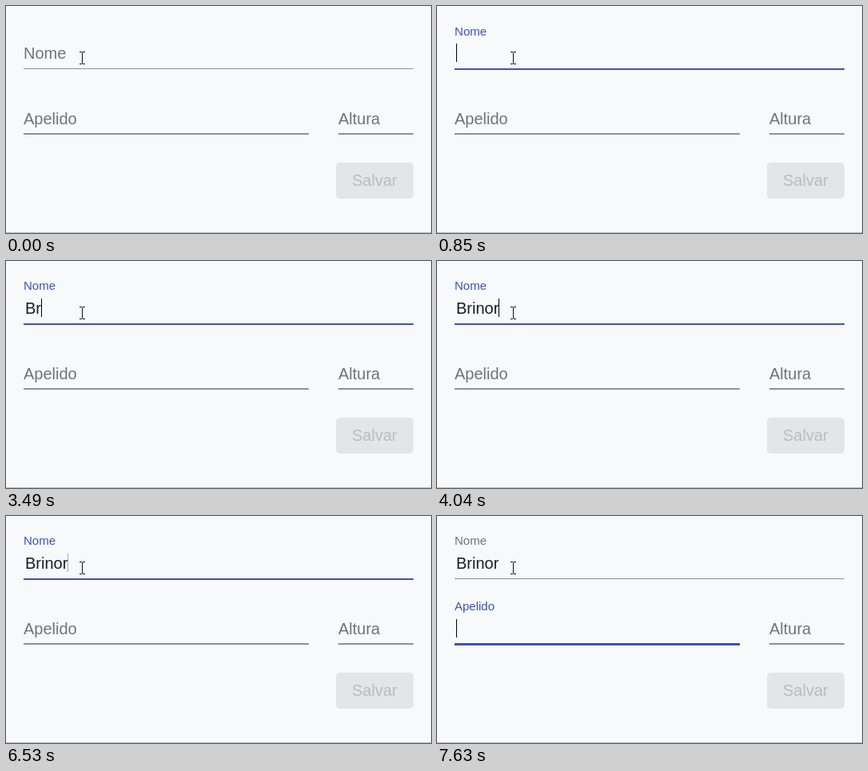
Recreate the animation shown at these times as an HTML page. Size 532 by 284 pixels, loop 8000 ms.

```html
<!DOCTYPE html>
<html lang="pt">
<head>
<meta charset="utf-8">
<title>Formulário</title>
<style>
  html, body { margin: 0; width: 100%; height: 100%; overflow: hidden; background: #f7f9fb; }
  svg { display: block; width: 532px; height: 284px; }
  text { font: 20px "Liberation Sans", Arial, sans-serif; white-space: pre; }
  rect, .pointer { shape-rendering: crispEdges; }
  .label { fill: rgb(114, 115, 117); }
  .line { fill: #909194; }
  .ripple { fill: #3f51b5; }
</style>
</head>
<body>
<svg viewBox="0 0 532 284">
  <rect width="532" height="284" fill="#f7f9fb"/>
  <rect y="283" width="532" height="1" fill="#bfc0c3"/>

  <rect class="line" x="22" y="78" width="488" height="1"/>
  <rect class="ripple" id="nameRipple" y="78" height="2"/>
  <text class="label" id="nameLabel">Nome</text>
  <text id="value" x="24" y="66" fill="#1c1c1d"></text>

  <rect class="line" x="22" y="159" width="357" height="2"/>
  <rect class="ripple" id="nickRipple" y="159" height="3"/>
  <text class="label" id="nickLabel">Apelido</text>

  <rect class="line" x="416" y="159" width="94" height="2"/>
  <text class="label" x="416" y="148">Altura</text>

  <rect x="413" y="196" width="97" height="45" rx="5" fill="#e4e5e6" style="shape-rendering:auto"/>
  <text x="433" y="225" fill="#bbbcbd">Salvar</text>

  <rect id="caret" width="1" height="23"/>
  <path class="pointer" fill="none" stroke="#111"
        d="M92 57.5h3m1 0h3M95.5 58v14M92 72.5h3m1 0h3"/>
</svg>
<script>
const LOOP = 8000;
const NAME = "Brinor";
const NAME_FOCUS = 580, NICK_FOCUS = 6580;
const KEY_TIMES = [2880, 3490, 3660, 3810, 3960, 4040];

// The screen refreshes in bursts: [first, last, steps].
const BURSTS = [
  [0, 0, 1], [610, 1160, 8], [1540, 1630, 2], [2010, 2170, 3], [2560, 2650, 2],
  [2880, 2880, 1], [3260, 3490, 4], [3660, 3660, 1], [3810, 3810, 1],
  [3960, 4040, 2], [4440, 4590, 3], [4960, 5040, 2], [5440, 5590, 3],
  [5970, 6060, 2], [6530, 7160, 9], [7540, 7630, 2]
];
const ticks = BURSTS.flatMap(([first, last, steps]) =>
  Array.from({ length: steps }, (_, i) =>
    Math.round(first + (last - first) * i / Math.max(1, steps - 1))));

const GRAY = [114, 115, 117], BLUE = [63, 81, 181];
const byId = id => document.getElementById(id);
const clamp = v => Math.min(1, Math.max(0, v));
const mix = (a, b, p) => a + (b - a) * p;

// cubic-bezier(.25, .8, .25, 1)
function ease(x) {
  if (x <= 0 || x >= 1) return clamp(x);
  const bezier = (a, b, s) => 3 * (1 - s) ** 2 * s * a + 3 * (1 - s) * s * s * b + s ** 3;
  let low = 0, high = 1;
  for (let i = 0; i < 24; i++) {
    const mid = (low + high) / 2;
    if (bezier(.25, .25, mid) < x) low = mid; else high = mid;
  }
  return bezier(.8, 1, low);
}

function drawLabel(id, baseline, lift, tint) {
  const y = mix(baseline, baseline - 30, lift);
  const label = byId(id);
  label.setAttribute("transform", `translate(22 ${y}) scale(${mix(1, .75, lift)})`);
  label.style.fill = `rgb(${GRAY.map((c, i) => Math.round(mix(c, BLUE[i], tint)))})`;
}

function drawRipple(id, width, elapsed, focused) {
  const ripple = byId(id);
  const w = width * mix(.5, 1, ease(elapsed / 300));
  ripple.setAttribute("x", 22 + (width - w) / 2);
  ripple.setAttribute("width", w);
  ripple.setAttribute("opacity", focused ? ease(elapsed / 100) : 0);
}

function caretOpacity(elapsed) {
  const phase = elapsed % 1000;
  return phase < 550 ? clamp((550 - phase) / 190) : clamp((phase - 900) / 100);
}

function render(time) {
  const t = ticks.findLast(tick => tick <= time);
  const sinceName = t - NAME_FOCUS, sinceNick = t - NICK_FOCUS;
  const onNick = sinceNick >= 0;
  const nameLift = ease(sinceName / 400), nickLift = ease(sinceNick / 400);

  drawLabel("nameLabel", 66, nameLift, nameLift - nickLift);
  drawLabel("nickLabel", 148, nickLift, nickLift);
  drawRipple("nameRipple", 488, sinceName, sinceName >= 0 && !onNick);
  drawRipple("nickRipple", 357, sinceNick, onNick);

  const value = byId("value");
  const typed = KEY_TIMES.filter(k => k <= t).length;
  value.textContent = NAME.slice(0, typed);

  const lastAction = onNick ? 6610 : typed ? KEY_TIMES[typed - 1] : 610;
  const textWidth = typed && !onNick ? value.getComputedTextLength() : 0;
  const caret = byId("caret");
  caret.setAttribute("x", Math.floor(24 + textWidth));
  caret.setAttribute("y", onNick ? 129 : 47);
  caret.setAttribute("opacity", t < 610 ? 0 : caretOpacity(t - lastAction));
}

const start = performance.now();
function loop() {
  render((performance.now() - start) % LOOP);
  requestAnimationFrame(loop);
}
loop();
</script>
</body>
</html>
```
